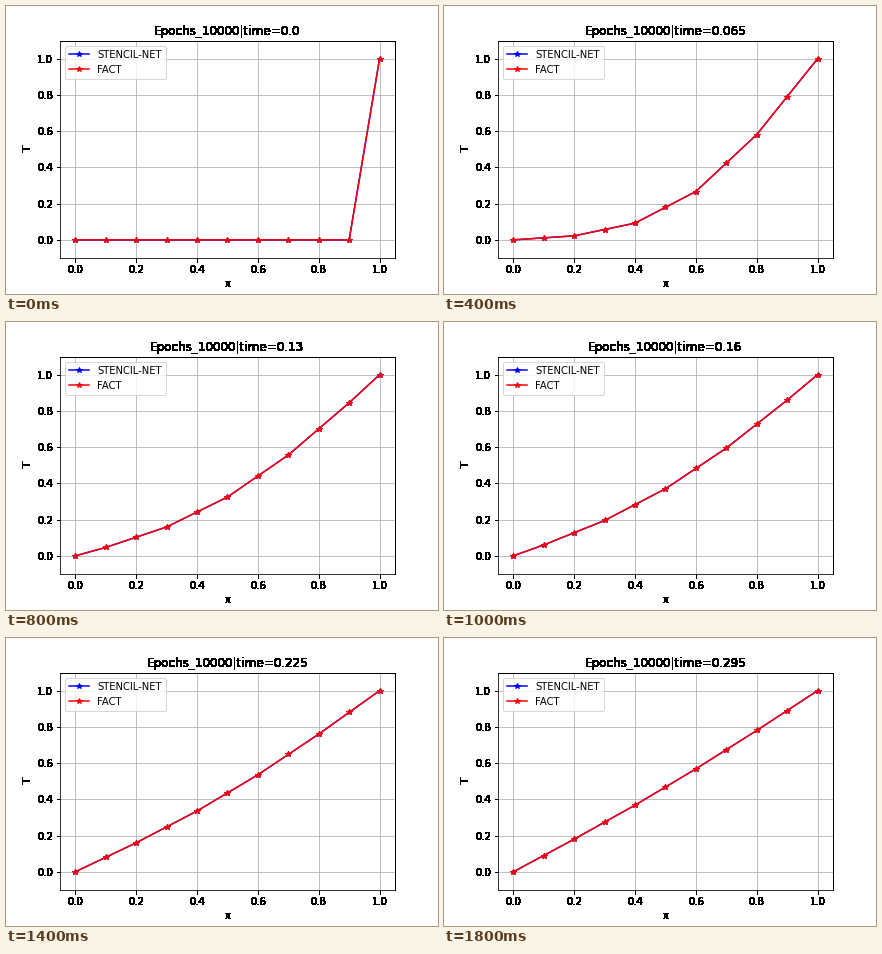
Animation, 432 px wide and 288 px high, one loop 2000 ms. Source, as a matplotlib script:

```python
import numpy as np
import matplotlib.pyplot as plt
from matplotlib.animation import FuncAnimation

FRAMES, INTERVAL = 10, 200
DT, DX, LAST_STEP = 0.005, 0.1, 59

plt.rcParams.update({"font.family": "DejaVu Sans", "font.size": 10})


def solve_heat():
    """Explicit heat equation on a rod with fixed ends, T(0)=0 and T(1)=1."""
    r = DT / DX**2
    rows = [np.zeros(11)]
    rows[0][-1] = 1
    for _ in range(LAST_STEP):
        u = rows[-1].copy()
        u[1:-1] += r * (u[2:] - 2 * u[1:-1] + u[:-2])
        rows.append(u)
    return rows


def harden(image, dpi):
    """Make every touched pixel fully opaque, so edges have no smoothing."""
    out = image.copy()
    touched = out[..., 3] > 0
    out[touched, :3] = 0
    out[..., 3] = touched
    return out, 0, 0


x = np.linspace(0, 1, 11)
history = solve_heat()
steps = np.linspace(0, LAST_STEP, FRAMES).astype(int)

fig, ax = plt.subplots(figsize=(6, 4), dpi=72, facecolor="white")
fig.subplots_adjust(left=0.125, right=0.9, bottom=0.125, top=0.88)
net, = ax.plot(x, history[0], "b-*", label="STENCIL-NET")
fact, = ax.plot(x, history[0], "r-*", label="FACT")

ticks = np.arange(6) / 5
ax.set(xlim=(-0.05, 1.05), ylim=(-0.1, 1.1), xticks=ticks, yticks=ticks)
ax.grid(True)
ax.legend(loc="upper left")
title = ax.set_title("", fontsize=12)

# Everything outside the plot area is drawn without smooth edges.
outside = [title, ax.set_xlabel("x"), ax.set_ylabel("T"),
           ax.spines["right"], ax.spines["top"]]
for axis in (ax.xaxis, ax.yaxis):
    for tick in axis.get_major_ticks():
        outside += [tick.label1, tick.tick1line]
for artist in outside:
    artist.set_agg_filter(harden)


def update(i):
    step = int(steps[i])
    for line in (net, fact):
        line.set_ydata(history[step])
    title.set_text(f"Epochs_10000|time={round(step * DT, 3)}")
    return net, fact, title


anim = FuncAnimation(fig, update, frames=FRAMES, interval=INTERVAL,
                     repeat=True, repeat_delay=0, blit=False)
plt.show()
```
